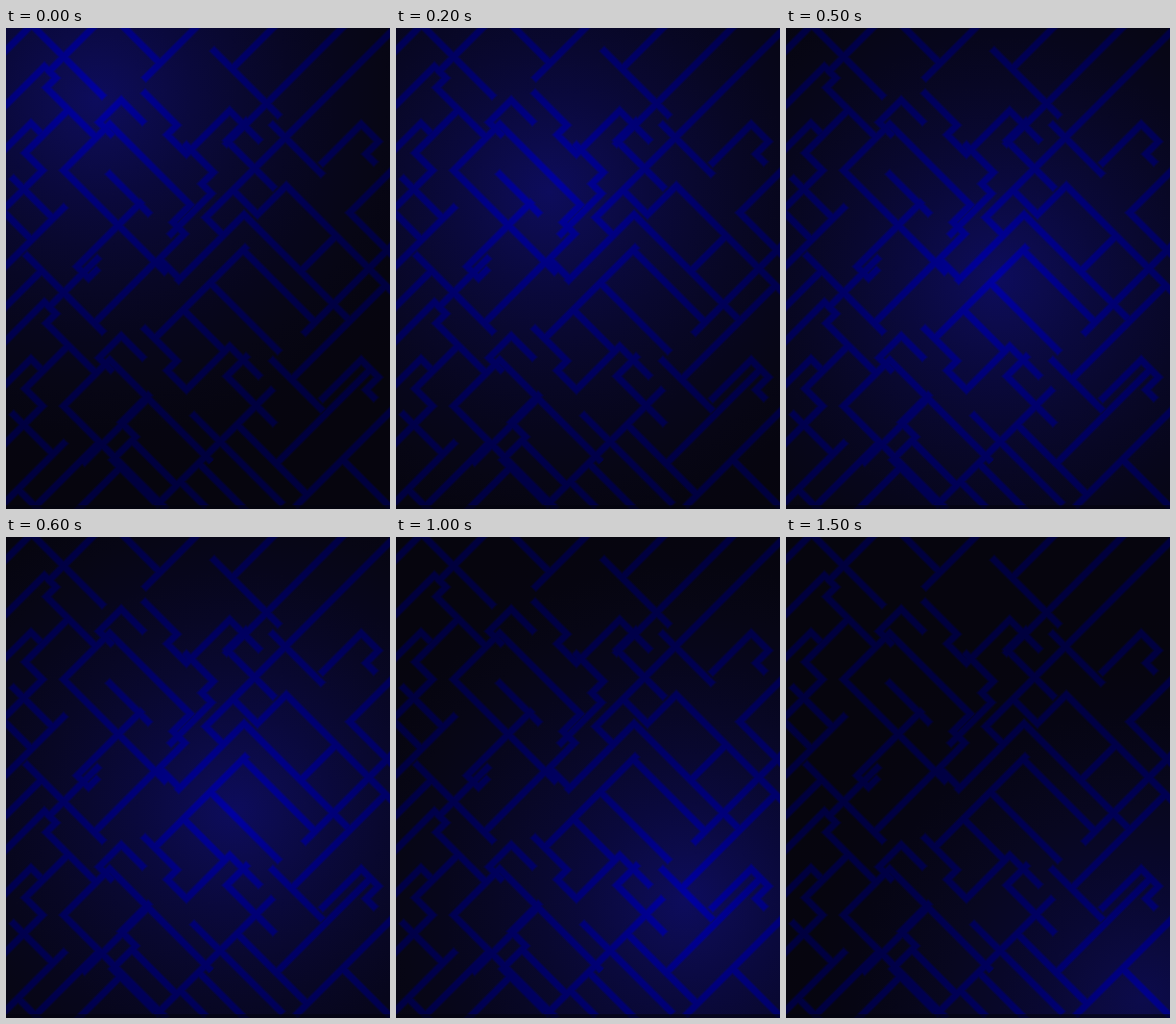
Recreate the animation shown at these times as an HTML page with a canvas. Size 400 by 500 pixels, loop 1.6 s.

```html
<!DOCTYPE html>
<html>
<head>
<meta charset="utf-8">
<style>
html, body { margin: 0; height: 100%; overflow: hidden; background: #05050f; }
canvas { display: block; }
</style>
</head>
<body>
<canvas id="stage" width="400" height="500"></canvas>
<script>
const ctx = document.getElementById('stage').getContext('2d');
const W = 400, H = 500, LOOP = 1600, STEP = 100, TILE = 245;
const maze = new Path2D();

// A walk alternates between the down-right and the up-right diagonal;
// negative steps go backwards, a leading 0 starts on the second diagonal.
function walk(x, y, ...steps) {
  maze.moveTo(x, y);
  steps.forEach((n, i) => {
    x += n;
    y += i % 2 ? -n : n;
    maze.lineTo(x, y);
  });
}

// Main walls, shared by the upper and the lower half
for (const y of [0, TILE]) {
  walk(0, y + 80, 0, 40, 12, -10, 51);
  walk(22, y - 8, 78);
  walk(45, y + 45, 0, 50);
  walk(0, y + 125, 0, 26, 8);
  walk(62, y + 88, 0, -42, 18, -38);
  walk(8, y + 157, 40);
  walk(0, y + 247, 0, 60);
  walk(148, y + 140, -40, -48, 105);
  walk(142, y + 97, -22, -23, 12);
  walk(145, y + 68, 33, -10, 20, 45, 30);
  walk(217, y + 24, 66);
  walk(278, y + 165, -48, 20);
  walk(278, y + 101, 50);
  walk(330, y + 140, 0, 40, 18, -13, 8);
}

// Walls of one half only
walk(148, 140, 44, -18, 12, -26, 20);
walk(108, 152, 40);
walk(140, 182, 0, -66, 12, 8);
walk(188, 122, 28, -12, 10, -42);
walk(400, 5, 0, -192, 16);
walk(240, 172, 22, 30, 38, 0, 70);
walk(230, 120, 0, 130);
walk(400, 150, 0, -42, 42);
walk(180, 262, 0, 68, 106);
walk(400, 228, 0, -88);
walk(148, 385, 66, 0, -66, -66);
walk(148, 382, 0, -28, 15, -24, 42);
walk(158, 495, 0, 118);
walk(182, 472, 24);
walk(196, 403, 90);

// Seeded side walls grow through the remaining gaps until they meet a wall
let seed = 7;
const random = () => (seed = seed * 16807 % 2147483647) / 2147483647;
const near = (x, y, d) => {
  ctx.lineWidth = 2 * d;
  return ctx.isPointInStroke(maze, x, y);
};
for (let i = 0; i < 300; i++) {
  const x = random() * W, y = random() * H, slope = random() < .5 ? 1 : -1;
  if (near(x, y, 24)) continue;
  const reach = dir => {
    let n = 0;
    while (n < 50 && !near(x + n * dir, y + n * dir * slope, 2)) n++;
    return n * dir;
  };
  const a = reach(-1), b = reach(1);
  maze.moveTo(x + a, y + a * slope);
  maze.lineTo(x + b, y + b * slope);
}

// The glow drifts towards the lower right, slowing down and fading at the end
function glowAt(t) {
  const p = (t / LOOP) ** .72;
  return { x: 95 + 290 * p, y: 75 + 425 * p, strength: .92 - .25 * Math.max(0, t - 1100) / 500 };
}

const mix = (a, b, f) => `rgb(${a.map((v, i) => v + (b[i] - v) * f)})`;

function glowFill({ x, y, strength }, dark, bright) {
  const g = ctx.createRadialGradient(x, y, 0, x, y, 400);
  for (let d = 0; d <= 1; d += .125) g.addColorStop(d, mix(dark, bright, strength * (1 - d) ** 1.8));
  return g;
}

function draw(now) {
  const glow = glowAt(Math.floor(now % LOOP / STEP) * STEP);
  ctx.fillStyle = glowFill(glow, [6, 5, 14], [14, 13, 100]);
  ctx.fillRect(0, 0, W, H);
  ctx.strokeStyle = glowFill(glow, [0, 0, 62], [0, 0, 170]);
  ctx.lineCap = 'square';
  ctx.globalAlpha = .5;
  ctx.lineWidth = 8.5;
  ctx.stroke(maze);
  ctx.globalAlpha = 1;
  ctx.lineWidth = 6;
  ctx.stroke(maze);
  ctx.fillStyle = 'rgba(4, 4, 14, .6)';
  ctx.fillRect(0, 496, W, 4);
  requestAnimationFrame(draw);
}
requestAnimationFrame(draw);
</script>
</body>
</html>
```
